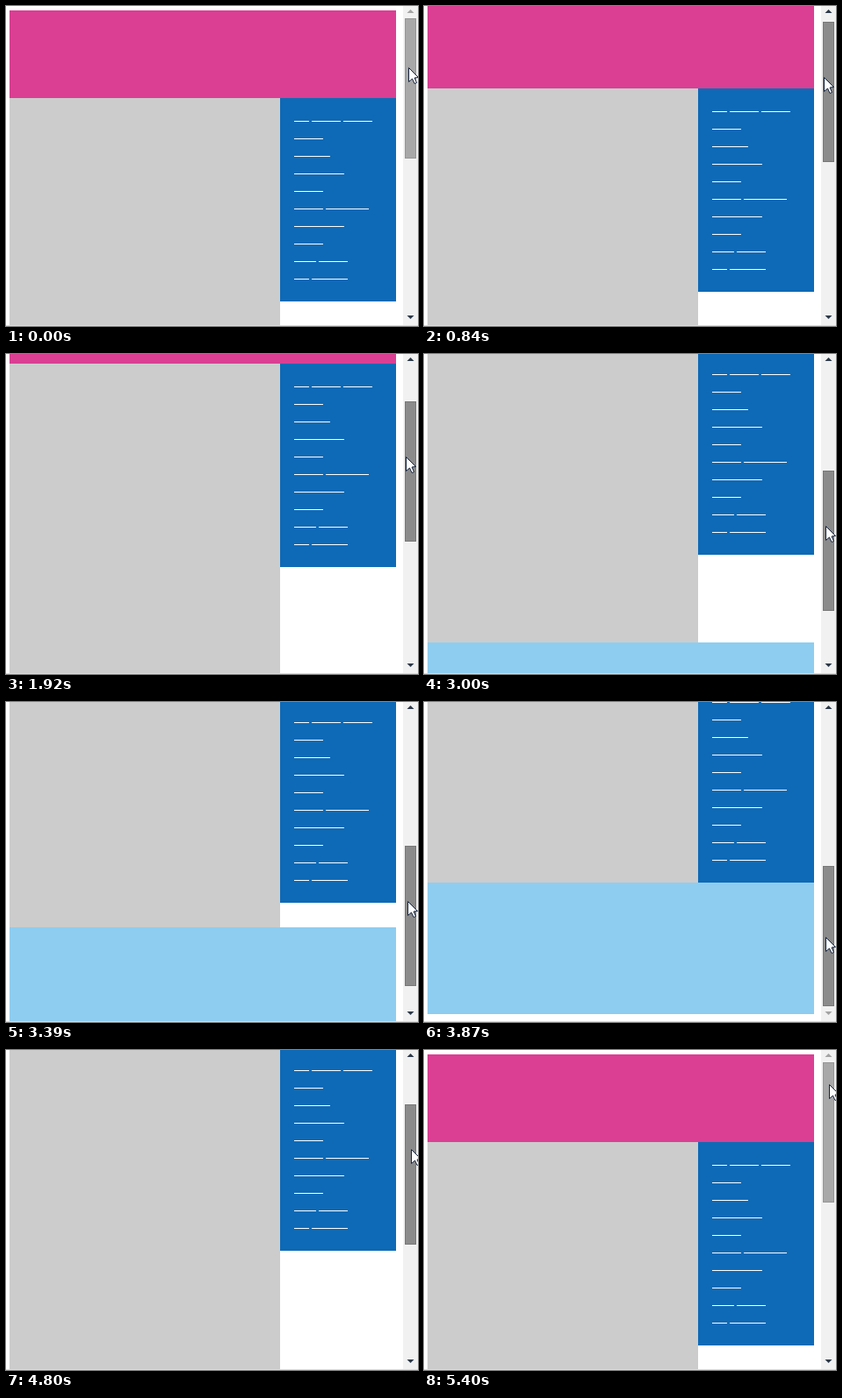
Recreate the animation shown at these times as an HTML page with a canvas. Size 469 by 365 pixels, loop 5430 ms.

```html
<!DOCTYPE html>
<html lang="en">
<head>
<meta charset="utf-8">
<title>Sticky sidebar</title>
<style>
  html, body { margin: 0; height: 100%; overflow: hidden; background: #fff; }
  canvas { display: block; }
</style>
</head>
<body>
<canvas id="stage" width="469" height="365"></canvas>
<script>
const ctx = document.getElementById('stage').getContext('2d');
const LOOP = 5430, STEP = 30;
const VIEW = 364, MAX_SCROLL = 399, MAX_DRAG = 173;
const RATIO = MAX_SCROLL / MAX_DRAG;
const CONTENT = 105, FOOTER = 605, SIDEBAR_HEIGHT = 232, STICKY_TOP = -3;

// One group per sidebar row, one digit per word: its length in 8px units
const LINKS = '244 4 5 7 4 46 7 4 34 25'.split(' ');

// Rises from 0 to 1 between two times
const ramp = (t, from, to) => Math.min(1, Math.max(0, (t - from) / (to - from)));

function dragAt(t) {
  const down = 27 * ramp(t, 720, 1290) + 14 * ramp(t, 1380, 1920) + 132 * ramp(t, 2000, 3660);
  const up = 124 * ramp(t, 4110, 4800) + 49 * ramp(t, 4800, 5190);
  return Math.floor(down - up + 1e-6);
}

// The pointer swings out, grabs the thumb, then overshoots both ends
function pointerAt(t, drag) {
  const approach = ramp(t, 0, 540);
  const swing = Math.sin(Math.PI * approach);
  const x = 458 - 3 * approach - 65 * swing
    + 2 * ramp(t, 2000, 3000) + 4 * ramp(t, 4110, 4800);
  const y = 70 + 6 * approach + 6 * swing + drag
    + 19 * ramp(t, 3660, 3870) - 56 * ramp(t, 4110, 5370);
  return [Math.round(x), Math.round(y)];
}

function rect(color, x, y, w, h) {
  ctx.fillStyle = color;
  ctx.fillRect(x, y, w, h);
}

function polygon(points, fill, stroke) {
  ctx.beginPath();
  points.forEach(([x, y]) => ctx.lineTo(x, y));
  ctx.closePath();
  ctx.fillStyle = fill;
  ctx.fill();
  if (stroke) {
    ctx.strokeStyle = stroke;
    ctx.stroke();
  }
}

function drawPage(scroll) {
  const footer = FOOTER - scroll;
  rect('#da3f93', 4, CONTENT - 100 - scroll, 440, 100);
  rect('#ccc', 4, CONTENT - scroll, 308, 500);
  rect('#8ecdf0', 4, footer, 440, 150);

  const top = Math.min(Math.max(CONTENT - scroll, STICKY_TOP), footer - SIDEBAR_HEIGHT);
  rect('#0e6ab6', 312, top, 132, SIDEBAR_HEIGHT);
  LINKS.forEach((words, row) => {
    let x = 328;
    for (const length of words) {
      rect('#fff', x, top + 26 + row * 20, length * 8 + 1, 1);
      x += length * 8 + 4;
    }
  });
}

function drawArrow(base, direction, enabled) {
  polygon([[456.5, base], [460.5, base + 4 * direction], [464.5, base]],
    enabled ? '#2c3848' : '#a3a3a3');
}

function drawScrollbar(scroll, fill, border) {
  const top = Math.floor(14 + scroll / RATIO);
  rect('#f1f1f1', 452, 0, 17, VIEW);
  rect(border, 454, top, 13, 160);
  rect(fill, 455, top + 1, 11, 158);
  drawArrow(8, -1, scroll > 0);
  drawArrow(353, 1, scroll < MAX_SCROLL);
}

function drawPointer(x, y) {
  ctx.save();
  ctx.translate(x + 0.5, y + 0.5);
  polygon([[0, 0], [0, 16], [4, 12.5], [6.5, 18], [9, 17], [6.5, 11.5], [11, 11]], '#fff', '#15233c');
  ctx.restore();
}

function draw(now) {
  const t = Math.floor(now % LOOP / STEP) * STEP;
  const drag = dragAt(t);
  const [x, y] = pointerAt(t, drag);
  const scroll = Math.floor(drag * RATIO + 1e-6);
  const pressed = t >= 540 && t < 5340;
  const thumb = pressed ? ['#8b8b8b', '#787878']
    : x < 452 ? ['#c1c1c1', '#a8a8a8'] : ['#a8a8a8', '#969696'];

  rect('#fff', 0, 0, 469, 365);
  drawPage(scroll);
  drawScrollbar(scroll, ...thumb);
  rect('#dcdcdc', 0, VIEW, 469, 1);
  drawPointer(x, y);
}

const start = performance.now();
function tick() {
  draw(performance.now() - start);
  requestAnimationFrame(tick);
}
tick();
</script>
</body>
</html>
```
